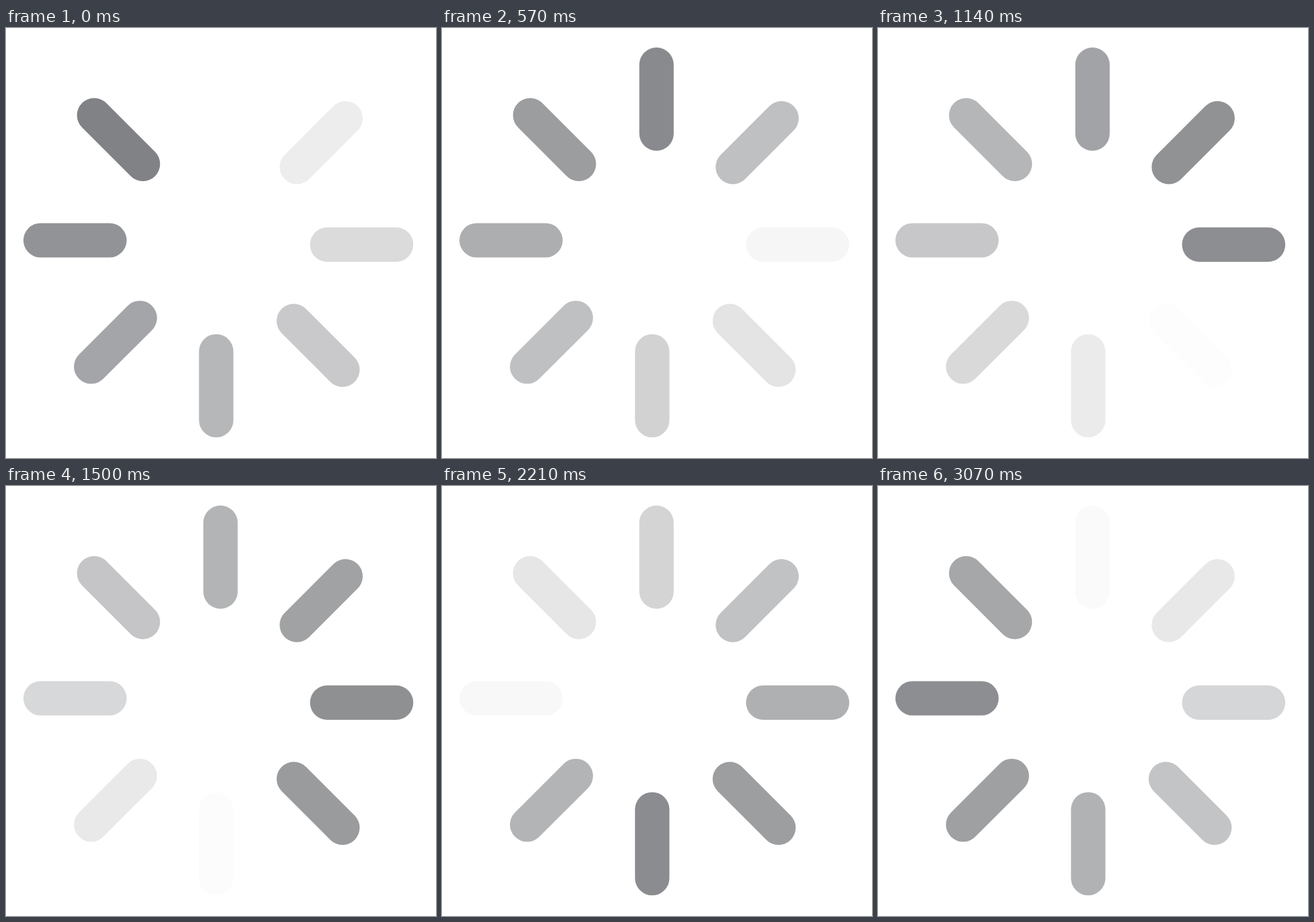
An HTML page that plays this animation: 640x640 px, repeating every 3.14 s.

```html
<!DOCTYPE html>
<html lang="en">
<head>
<meta charset="utf-8">
<title>Loading spinner</title>
<style>
  html, body { margin: 0; width: 100%; height: 100%; overflow: hidden; background: #fff; }
  svg { display: block; width: 100%; height: 100%; }
  line { stroke: #808285; stroke-width: 51.2; stroke-linecap: round; }
</style>
</head>
<body>
<svg viewBox="0 0 640 640"><g id="spinner" transform="translate(316.05 319.2)"></g></svg>
<script>
const LOOP = 3140;
const BARS = 8;
const RISE = 10;              // animation ticks from clear to full colour
const TICKS = BARS * RISE;
const spinner = document.getElementById('spinner');

const bars = Array.from({ length: BARS }, (_, i) => {
  const bar = document.createElementNS(spinner.namespaceURI, 'line');
  const place = { x1: 3.2, y1: -162.05, x2: 3.2, y2: -264.55, transform: `rotate(${i * 360 / BARS})` };
  for (const [name, value] of Object.entries(place)) bar.setAttribute(name, value);
  return spinner.appendChild(bar);
});

// A 25 fps animation held at 11 fps and shown at 14 fps gives the uneven stepping.
function tickAt(ms) {
  const shown = Math.min(43, Math.floor((ms + 5) * 14 / 1000));
  const held = Math.ceil(shown * 11 / 14 - 0.1);
  return Math.floor(held * 25 / 11);
}

// Quick fade in, then a slow linear fade out over the rest of the loop.
function opacityAt(age) {
  return age < RISE ? age / RISE : (TICKS - age) / (TICKS - RISE);
}

function draw(ms) {
  const tick = tickAt(ms % LOOP);
  bars.forEach((bar, i) => {
    const age = (tick - i * RISE + TICKS) % TICKS;
    bar.setAttribute('stroke-opacity', opacityAt(age));
  });
}

let start;
function loop(now) {
  start ??= now;
  draw(now - start);
  requestAnimationFrame(loop);
}
draw(0);
requestAnimationFrame(loop);
</script>
</body>
</html>
```
